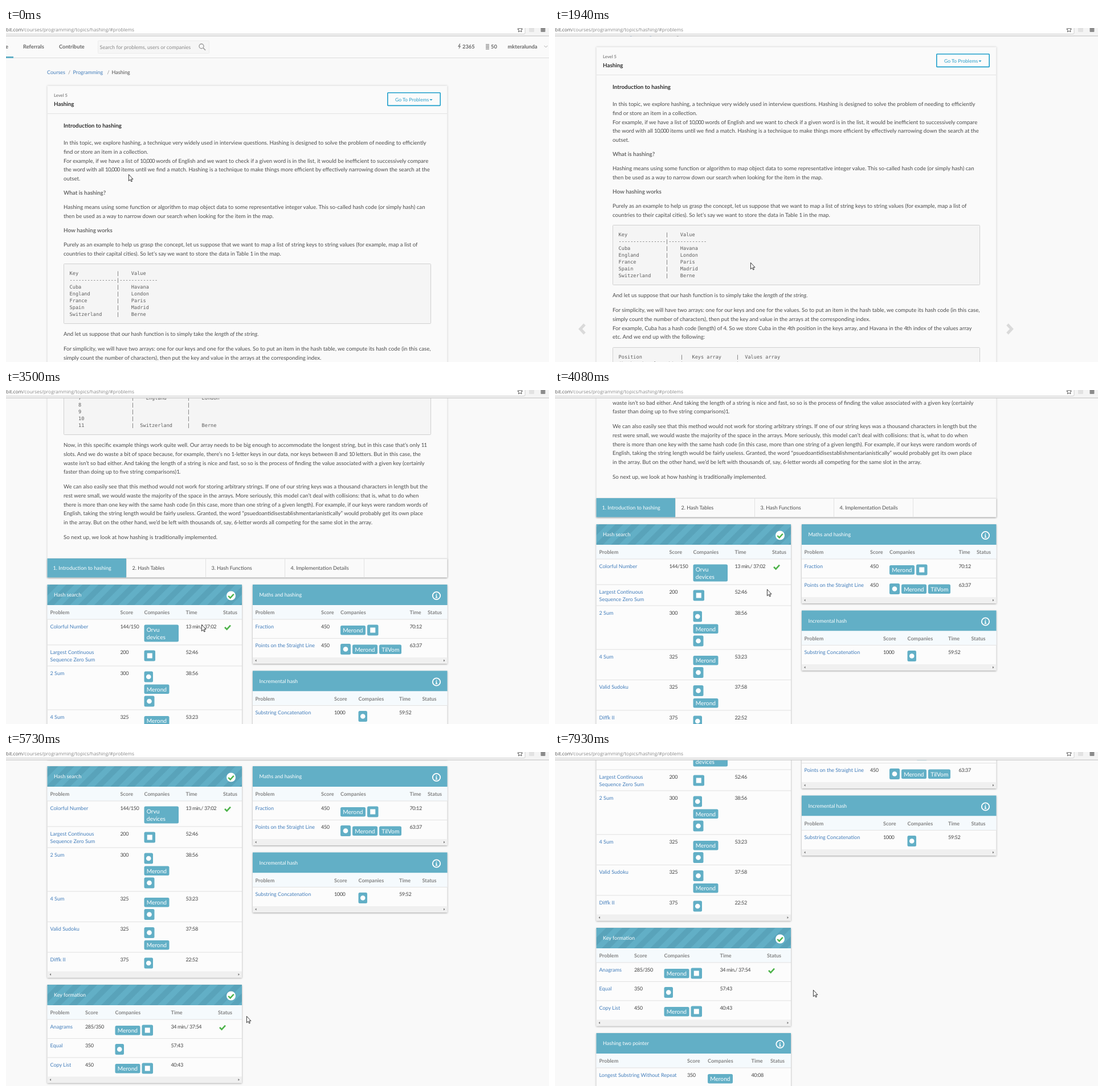
An HTML page that plays this animation: 953x587 px, repeating every 8 s.

```html
<!DOCTYPE html>
<html lang="en">
<head>
<meta charset="utf-8">
<title>Hashing</title>
<style>
  html, body { margin: 0; width: 100%; height: 100%; overflow: hidden; background: #f9f9f9; }
  svg { display: block; width: 953px; height: 587px; overflow: hidden; }
  text { font: 9.05px Lato, "Open Sans", sans-serif; fill: #4c4c4c; white-space: pre; text-rendering: geometricPrecision; }
  .body { font-size: 9.64px; fill: #4c4c4c; }
  .body .em { font-style: italic; }
  .body .digits { letter-spacing: -.75px; }
  .head { font-size: 9.8px; font-weight: bold; fill: #2e2e2e; }
  .sub { font-size: 9.87px; font-weight: bold; fill: #6a6a6a; }
  .level { font-size: 7.6px; font-weight: bold; fill: #888; }
  .nav { font-size: 9.3px; font-weight: bold; fill: #666; }
  .hint { fill: #888; }
  .link { fill: #427dbb; }
  .num { letter-spacing: -.4px; fill: #444; }
  .col { font-weight: bold; fill: #838383; }
  .white { fill: #fff; }
  .tag { font-size: 10.2px; fill: #fff; }
  .button { font-size: 8.6px; fill: #2a9fca; }
  .url { font: 8.4px "Open Sans", "Noto Sans", sans-serif; fill: #888; }
  .url tspan { fill: #555; }
  .code { font: 8.57px "DejaVu Sans Mono", "Liberation Mono", monospace; fill: #5c5c5c; }
  .shadow { filter: drop-shadow(0 1px 1.5px rgba(0, 0, 0, .35)); }
  .card { filter: drop-shadow(0 0 1.5px rgba(0, 0, 0, .22)); }
</style>
</head>
<body>
<svg id="stage" viewBox="0 0 953 587">
  <defs>
    <pattern id="stripes" width="20" height="20" patternUnits="userSpaceOnUse" patternTransform="rotate(45)">
      <rect width="20" height="20" fill="#62afc6"/><rect width="10" height="20" fill="#59a3ba"/>
    </pattern>
  </defs>
  <g id="page"></g>
  <g id="browser"></g>
  <path id="cursor" d="M.4.4V11.8L3 9.4 4.8 13 6.4 12.3 4.7 8.7H8Z" fill="#fff" stroke="#222" stroke-width=".9"/>
</svg>
<script>
const TEAL = '#62afc6', LINE = '#e2e2e2', GREEN = '#4db34a';

const rect = (x, y, w, h, fill, extra = '') =>
  `<rect x="${x}" y="${y}" width="${w}" height="${h}" fill="${fill}" ${extra}/>`;
const circle = (x, y, r, fill, extra = '') =>
  `<circle cx="${x}" cy="${y}" r="${r}" fill="${fill}" ${extra}/>`;
const path = (d, color, width) => width
  ? `<path d="${d}" fill="none" stroke="${color}" stroke-width="${width}"/>`
  : `<path d="${d}" fill="${color}"/>`;
// y is the middle of the line
const text = (x, y, str, cls = '') =>
  `<text x="${x}" y="${y}" dy=".35em" class="${cls}" xml:space="preserve">${str}</text>`;
const lines = (x, y, step, list, cls) =>
  list.map((str, i) => text(x, y + i * step, str, cls)).join('');
const tightDigits = str => str.replace(/\d[\d,]*/g, '<tspan class="digits">$&</tspan>');
const para = (y, ...list) => lines(101, y, 15.85, list.map(tightDigits), 'body');
const codeBox = (y, h, list) =>
  rect(101.5, y + .5, 644, h, '#f5f5f5', 'stroke="#d0d0d0" rx="1"') + lines(111.6, y + 17, 12, list, 'code');
const check = (x, y, s = 1) =>
  path(`M${x - 5 * s} ${y}l${3.6 * s} ${3.6 * s} ${6.4 * s} ${-7 * s}`, GREEN, 2.6 * s);

function topBar() {
  return rect(0, 14, 953, 38, '#fafafa') + rect(0, 52, 953, 1, '#dcdcdc') + rect(0, 50, 13, 3, TEAL) +
    text(-1, 32.5, 'e', 'nav') + text(30, 32.5, 'Referrals', 'nav') + text(93, 32.5, 'Contribute', 'nav') +
    rect(161.5, 22.5, 195, 22, '#f6f6f6', 'stroke="#ececec" rx="1"') +
    text(164.5, 33.5, 'Search for problems, users or companies', 'hint') +
    circle(343, 32, 4, 'none', 'stroke="#999" stroke-width="1.3"') + path('M346 35l4 4', '#999', 1.6) +
    path('M796 27.5L793 33H795.5L794.5 37.5 798.5 31.5H796L797.5 27.5Z', '#888') +
    text(801, 32.5, '2365', 'nav') +
    path('M842 29h6M842 31.7h6M842 34.4h6M842 37h6', '#999', 1.7) +
    text(851, 32.5, '50', 'nav') + text(880.5, 32.5, 'mkteralunda', 'nav') +
    path('M944.5 31l3 3 3-3', '#aaa', 1);
}

function crumbs() {
  return text(72, 78, 'Courses', 'link') + text(109, 78, '/', 'hint') +
    text(117.5, 78, 'Programming', 'link') + text(177.5, 78, '/', 'hint') + text(185.5, 78, 'Hashing');
}

function article() {
  const pair = (key, value) => key.padEnd(16) + '|    ' + value;
  const triple = (pos, key = '', value = '') => pos.padEnd(21) + '|' + key.padEnd(18) + '|' + value;
  const stored = {
    4: ['    Cuba', '    Havana'], 5: ['    Spain', '    Madrid'], 6: ['    France', '    Paris'],
    7: ['    England', '    London'], 11: ['  Switzerland', '    Berne']
  };
  const slots = Array.from({ length: 11 }, (_, i) => triple('   ' + (i + 1), ...(stored[i + 1] || [])));

  return rect(72.5, 101.5, 702, 968, '#fafafa', 'class="card"') +
    text(84, 118, 'Level 5', 'level') + text(84, 133.5, 'Hashing', 'head') + rect(73, 150, 701, 1, LINE) +
    rect(669.8, 113.8, 92.4, 22.6, '#fbfbfb', 'stroke="#1f9fcb" stroke-width="1.6" rx="1"') +
    text(683, 125.5, 'Go To Problems', 'button') + path('M743.5 125h5l-2.5 2.8Z', '#2a9fca') +
    text(101, 172, 'Introduction to hashing', 'head') +
    para(201.5,
      'In this topic, we explore hashing, a technique very widely used in interview questions. Hashing is designed to solve the problem of needing to efficiently',
      'find or store an item in a collection.',
      'For example, if we have a list of 10,000 words of English and we want to check if a given word is in the list, it would be inefficient to successively compare',
      'the word with all 10,000 items until we find a match. Hashing is a technique to make things more efficient by effectively narrowing down the search at the',
      'outset.') +
    text(101, 290, 'What is hashing?', 'sub') +
    para(314.5,
      'Hashing means using some function or algorithm to map object data to some representative integer value. This so-called hash code (or simply hash) can',
      'then be used as a way to narrow down our search when looking for the item in the map.') +
    text(101, 355.5, 'How hashing works', 'sub') +
    para(380.5,
      'Purely as an example to help us grasp the concept, let us suppose that we want to map a list of string keys to string values (for example, map a list of',
      'countries to their capital cities). So let’s say we want to store the data in Table 1 in the map.') +
    codeBox(414, 105, [pair('Key', 'Value'), '-'.repeat(16) + '|' + '-'.repeat(13),
      pair('Cuba', 'Havana'), pair('England', 'London'), pair('France', 'Paris'),
      pair('Spain', 'Madrid'), pair('Switzerland', 'Berne')]) +
    para(537.5, 'And let us suppose that our hash function is to simply take the <tspan class="em">length of the string.</tspan>') +
    para(563.5,
      'For simplicity, we will have two arrays: one for our keys and one for the values. So to put an item in the hash table, we compute its hash code (in this case,',
      'simply count the number of characters), then put the key and value in the arrays at the corresponding index.',
      'For example, Cuba has a hash code (length) of 4. So we store Cuba in the 4th position in the keys array, and Havana in the 4th index of the values array',
      'etc. And we end up with the following:') +
    path('M52 589l-7.5 8 7.5 8', '#dadada', 5) + path('M794 589l7.5 8-7.5 8', '#dadada', 5) +
    codeBox(629, 189, [triple('Position', '   Keys array', '  Values array'), triple('(hash = key length)'),
      '-'.repeat(21) + '|' + '-'.repeat(18) + '|' + '-'.repeat(15), ...slots]) +
    para(836.5,
      'Now, in this specific example things work quite well. Our array needs to be big enough to accommodate the longest string, but in this case that’s only 11',
      'slots. And we do waste a bit of space because, for example, there’s no 1-letter keys in our data, nor keys between 8 and 10 letters. But in this case, the',
      'waste isn’t so bad either. And taking the length of a string is nice and fast, so so is the process of finding the value associated with a given key (certainly',
      'faster than doing up to five string comparisons)1.') +
    para(909.5,
      'We can also easily see that this method would not work for storing arbitrary strings. If one of our string keys was a thousand characters in length but the',
      'rest were small, we would waste the majority of the space in the arrays. More seriously, this model can’t deal with collisions: that is, what to do when',
      'there is more than one key with the same hash code (in this case, more than one string of a given length). For example, if our keys were random words of',
      'English, taking the string length would be fairly useless. Granted, the word “psuedoantidisestablishmentarianistically” would probably get its own place',
      'in the array. But on the other hand, we’d be left with thousands of, say, 6-letter words all competing for the same slot in the array.') +
    para(999, 'So next up, we look at how hashing is traditionally implemented.');
}

function tabs() {
  const names = ['1. Introduction to hashing', '2. Hash Tables', '3. Hash Functions', '4. Implementation Details'];
  return rect(72.5, 1036, 702, 33.5, '#fafafa', 'class="shadow"') + rect(73, 1036, 701, 1, LINE) +
    rect(72.5, 1036, 138.5, 33.5, TEAL) +
    names.map((name, i) => text(82.5 + i * 139, 1053, name, i ? '' : 'white') +
      rect(211 + i * 139, 1036, 1, 33.5, LINE)).join('');
}

const TAGS = {
  A: { w: 44, lines: ['Merond'] }, I: { w: 39, lines: ['TilVom'] }, E: { w: 60.5, lines: ['Orvu', 'devices'] },
  f: { w: 15.5 }, g: { w: 18 }, w: { w: 19.5, square: true }
};

function tag(x, y, { w, lines: words, square }) {
  if (!words) return rect(x, y - 9.5, w, 19, TEAL, 'rx="2.5"') +
    (square ? rect(x + w / 2 - 4.5, y - 4.5, 9, 9, '#fff') : circle(x + w / 2, y, 4.3, '#fff'));
  const extra = (words.length - 1) * 13.5;
  return rect(x, y - 8, w, 16.5 + extra, TEAL, 'rx="2.5"') + lines(x + 4.2, y + .5, 13.5, words, 'tag');
}

// row: [height, problem, score, tag lines, time, solved]
function panel(x, y, title, done, stops, rows, cut) {
  const w = 341.5, bodyTop = y + 61;
  const height = 61 + rows.reduce((sum, r) => sum + r[0], 0) + (cut ? 0 : 11);
  let out = rect(x, y, w, height, '#fcfcfc', 'class="shadow"') +
    rect(x, y, w, 36, done ? 'url(#stripes)' : TEAL) + text(x + 11.5, y + 18.3, title, 'white') +
    rect(x, y + 36, w, 25, '#f5fafd') + rect(x, bodyTop - .5, w, 1, LINE);
  const ix = x + w - 19, iy = y + 19.5;
  out += done
    ? circle(ix, iy, 8, '#fff') + check(ix, iy + .5, .95)
    : circle(ix, iy, 6.7, 'none', 'stroke="#fff" stroke-width="1.8"') +
      path(`M${ix} ${iy - 3.6}v1.8M${ix} ${iy - .8}v4.4M${ix - 1.4} ${iy - .3}h1.4M${ix - 1.7} ${iy + 3.3}h3.4`, '#fff', 1.5);
  ['Problem', 'Score', 'Companies', 'Time', 'Status'].forEach((name, i) => out += text(stops[i], y + 49, name, 'col'));

  let top = bodyTop;
  rows.forEach(([h, problem, score, tags, time, solved], i) => {
    if (i) out += rect(x, top - .5, w, 1, LINE);
    out += lines(stops[0], top + 12.5, 13, problem.split('|'), 'link') +
      text(stops[1], top + 12.5, score, 'num') + text(stops[3], top + 12.5, time, 'num');
    tags.split('/').forEach((group, n) => {
      let tx = stops[2];
      for (const key of group) {
        out += tag(tx, top + (key === 'E' ? 17.5 : 19) + n * 21.5, TAGS[key]);
        tx += TAGS[key].w + 3;
      }
    });
    if (solved) out += check(stops[4] + 8, top + 14);
    top += h;
  });
  if (!cut) {
    const m = top + 5.5;
    out += rect(x, top, w, 11, '#f0f0f0') +
      path(`M${x + 6.5} ${m - 2}v4l-2.5-2ZM${x + w - 6.5} ${m - 2}v4l2.5-2Z`, '#777');
  }
  return out;
}

function panels() {
  return panel(72.5, 1082, 'Hash search', true, [77.5, 200.5, 242.5, 315.5, 381], [
      [45, 'Colorful Number', '144/150', 'E', '13 min./ 37:02', true],
      [37, 'Largest Continuous|Sequence Zero Sum', '200', 'w', '52:46'],
      [77, '2 Sum', '300', 'f/A/g', '38:56'],
      [53.5, '4 Sum', '325', 'A/g', '53:23'],
      [53.5, 'Valid Sudoku', '325', 'g/A', '37:58'],
      [33.5, 'Diffk II', '375', 'f', '22:52']]) +
    panel(433, 1082, 'Maths and hashing', false, [437.5, 553, 587, 708.5, 740], [
      [33.5, 'Fraction', '450', 'Aw', '70:12'],
      [33.5, 'Points on the Straight Line', '450', 'gAI', '63:37']]) +
    panel(433, 1233.5, 'Incremental hash', false, [437.5, 576, 618.5, 690, 730.5], [
      [33.5, 'Substring Concatenation', '1000', 'f', '59:52']]) +
    panel(72.5, 1466, 'Key formation', true, [77.5, 139, 191.5, 289.5, 372], [
      [33.5, 'Anagrams', '285/350', 'Aw', '34 min./ 37:54', true],
      [33.5, 'Equal', '350', 'f', '57:43'],
      [33.5, 'Copy List', '450', 'Aw', '40:43']]) +
    panel(72.5, 1651, 'Hashing two pointer', false, [77.5, 232, 268, 344.5, 378], [
      [33.5, 'Longest Substring Without Repeat', '350', 'A', '40:08'],
      [60, 'Window String', '350', 'gA', '68:55']], true);
}

function browser() {
  return rect(0, 0, 953, 14, '#f4f4f4') + rect(-4, -5, 915, 15.5, '#fff', 'stroke="#cfcfcf" rx="2"') +
    rect(0, 13.5, 953, 1, '#bdbdbd') +
    text(0, 2.8, '<tspan>bit.com</tspan>/courses/programming/topics/hashing/#problems', 'url') +
    path('M902.2-1.5l1.3 2.9 3.1.3-2.3 2.1.7 3.1-2.8-1.6-2.8 1.6.7-3.1-2.3-2.1 3.1-.3Z', '#555', 1) +
    rect(918, -1, 9, 8, '#e2e2e2', 'rx="1"') + rect(938.5, -1, 8, 8, '#8c8c8c', 'rx="1"');
}

const byId = id => document.getElementById(id);
byId('page').innerHTML = topBar() + crumbs() + article() + tabs() + panels();
byId('browser').innerHTML = browser();

const LOOP = 8000;
function play(el, steps, move) {
  const frames = steps.map(([time, ...at]) => ({ offset: time / LOOP, transform: move(...at), easing: 'step-end' }));
  frames.push({ ...frames[frames.length - 1], offset: 1 });
  el.animate(frames, { duration: LOOP, iterations: Infinity });
}

// [ms, scroll offset]
play(byId('page'), [
  [0, 0], [1540, 6], [1670, 30], [1800, 58], [1940, 68], [2090, 110], [2220, 175], [2360, 240], [2490, 282],
  [2650, 352], [2930, 439], [3070, 560], [3200, 634], [3500, 740], [3650, 828], [3800, 846],
  [5420, 900], [5570, 990], [5730, 1057], [6010, 1080], [6140, 1128], [6260, 1168], [6410, 1198], [7930, 1157]
], y => `translate(0px, ${-y}px)`);

// [ms, x, y] of the pointer tip
play(byId('cursor'), [
  [0, 215, 257], [720, 255, 305], [860, 322, 388], [1010, 343, 412],
  [4080, 372, 350], [4210, 340, 270], [4350, 300, 213], [4490, 360, 250], [4620, 440, 290],
  [4760, 482, 350], [4890, 455, 420], [5020, 428, 456], [5170, 422, 464],
  [6540, 421, 440], [6680, 419, 395], [6820, 417, 345], [6950, 416, 322], [7070, 438, 378], [7220, 453, 418]
], (x, y) => `translate(${x}px, ${y}px)`);
</script>
</body>
</html>
```
